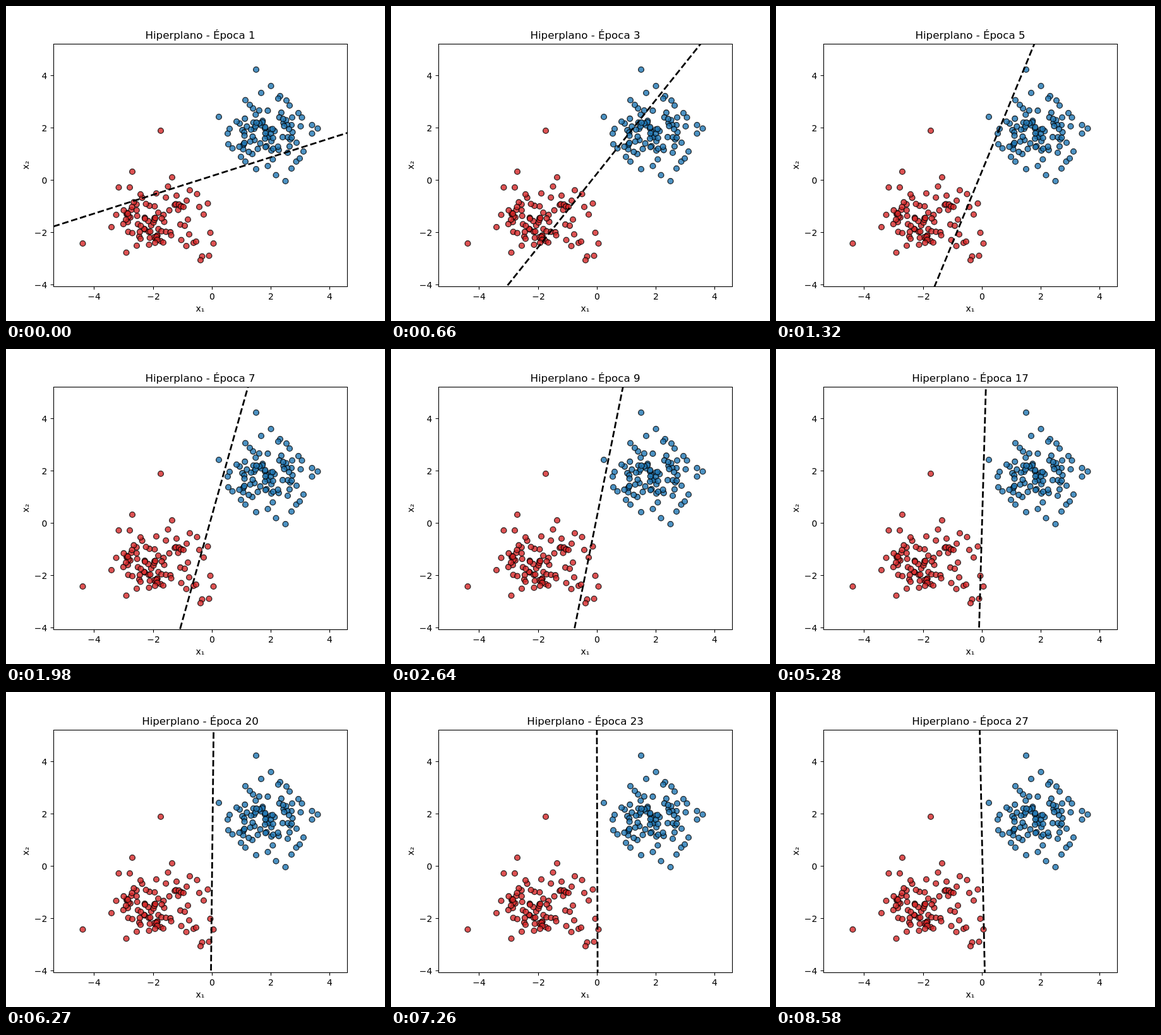
Write an HTML page that moves like this. It is 600 by 500 pixels and loops after 8910 ms.

```html
<!DOCTYPE html>
<html lang="pt">
<head>
<meta charset="utf-8">
<style>
  html, body { margin: 0; width: 100%; height: 100%; overflow: hidden; background: #fff; }
  svg { display: block; font: 13.89px "DejaVu Sans", sans-serif; }
  .dots { stroke: #000; stroke-width: 1.39; fill-opacity: .8; stroke-opacity: .8; }
  .axes { fill: none; stroke: #000; stroke-width: 1.11; }
</style>
</head>
<body>
<svg width="600" height="500" viewBox="0 0 600 500">
  <clipPath id="plot"><rect x="75" y="60" width="465.5" height="385.5"/></clipPath>
  <g id="red" class="dots" fill="#d62728"></g>
  <g id="blue" class="dots" fill="#1f77b4"></g>
  <g clip-path="url(#plot)">
    <path id="line" stroke="#000" stroke-width="2.78" stroke-dasharray="10.28 4.44"/>
  </g>
  <rect class="axes" x="75.5" y="60.5" width="465" height="385"/>
  <g id="ticks"></g>
  <text id="title" x="307.5" y="51.7" font-size="16.67" text-anchor="middle"></text>
  <text x="307.5" y="485" text-anchor="middle">x₁</text>
  <text transform="translate(36 252.5) rotate(-90)" text-anchor="middle">x₂</text>
</svg>
<script>
const $ = id => document.getElementById(id);
const STEP = 330, EPOCHS = 27, MID_Y = 252.5, HEIGHT = 385;

let seed = 7;
const random = () => (seed = seed * 16807 % 2147483647) / 2147483647;
const dot = (x, y) => `<circle cx="${x}" cy="${y}" r="4.39"/>`;

// A cluster is a dense random core plus its distinct outer points.
function cluster(id, count, cx, cy, rx, ry, outer) {
  let dots = '';
  for (let i = 0; i < count; i++) {
    const r = random() ** .6, a = random() * 2 * Math.PI;
    dots += dot(cx + rx * r * Math.cos(a), cy + ry * r * Math.sin(a));
  }
  $(id).innerHTML = dots + outer.map(p => dot(...p)).join('');
}

cluster('red', 60, 235, 337, 54, 37, [
  [245, 198], [200, 263], [263, 272], [256.5, 286.5], [178.5, 288], [196, 288], [291, 292.5],
  [302.5, 298.5], [319.5, 313.5], [306, 319], [313, 331], [286, 309], [281, 319], [323.5, 360],
  [328.5, 377], [321.5, 396.5], [310.5, 397.5], [308, 403.5], [297, 376], [301, 374],
  [285.5, 381], [277.5, 371.5], [290, 362.5], [261.5, 364], [226.5, 379], [236, 376],
  [249, 375.5], [207, 380.5], [190.5, 391.5], [213, 369.5], [200, 360.5], [167, 351],
  [121.5, 377], [174.5, 331.5], [193, 329.5], [213, 299], [199.5, 319], [238, 297.5],
  [270, 301], [288, 339]]);
cluster('blue', 66, 409, 202, 45, 46, [
  [396, 101], [419.5, 127], [404, 138], [379, 149.5], [337, 176], [351, 202.5], [354, 195],
  [352, 219.5], [358.5, 226], [365, 183.5], [372, 239.5], [379, 247], [396, 259], [414.5, 254],
  [427.5, 268.5], [442.5, 278], [452, 258], [459.5, 247], [465, 242], [471, 231], [460, 217],
  [484.5, 202.5], [484.5, 189], [493.5, 194.5], [466.5, 191], [468.5, 177], [463, 170],
  [453, 177], [449, 158], [444, 150], [434, 143], [431, 147], [386, 157], [446, 233]]);

$('ticks').innerHTML = [-4, -2, 0, 2, 4].map(v => {
  const x = Math.floor(326.4 + 46.64 * v) + .5, y = 276.5 - 41.5 * v;
  const label = String(v).replace('-', '−');
  return `<path class="axes" d="M${x} 445.5v4.86M75.5 ${y}h-4.86"/>
    <text x="${x}" y="465.6" text-anchor="middle">${label}</text>
    <text x="65.3" y="${y + 5}" text-anchor="end">${label}</text>`;
}).join('');

// epoch, horizontal run of the line over the plot height, drift of its centre per run
const poses = [[1, 1205.4, .0446], [5, 158, .0225], [9, 77, .029], [13, 36, .028],
  [17, 10.8, .035], [23, -1.2, 0], [27, -8, 0]];
const mix = (a, b, k) => a + (b - a) * k;

function boundary(epoch) {
  const i = Math.max(1, poses.findIndex(p => p[0] >= epoch));
  const [e0, run0, drift0] = poses[i - 1], [e1, run1, drift1] = poses[i];
  const k = (epoch - e0) / (e1 - e0);
  const run = 1 / mix(1 / (run0 + 50), 1 / (run1 + 50), k) - 50;
  const mid = 326.5 + run * mix(drift0, drift1, k);
  const xAt = y => mid - run * (y - MID_Y) / HEIGHT;
  const start = run > 0 ? Math.min(501, MID_Y + HEIGHT * (mid - 75) / run) : -1;
  const end = run > 0 ? -1 : 501;
  return `M${xAt(start)} ${start}L${xAt(end)} ${end}`;
}

const begin = performance.now();
let shown = 0;
function frame() {
  const epoch = 1 + Math.floor((performance.now() - begin) / STEP) % EPOCHS;
  if (epoch !== shown) {
    shown = epoch;
    $('title').textContent = `Hiperplano - Época ${epoch}`;
    $('line').setAttribute('d', boundary(epoch));
  }
  requestAnimationFrame(frame);
}
frame();
</script>
</body>
</html>
```
